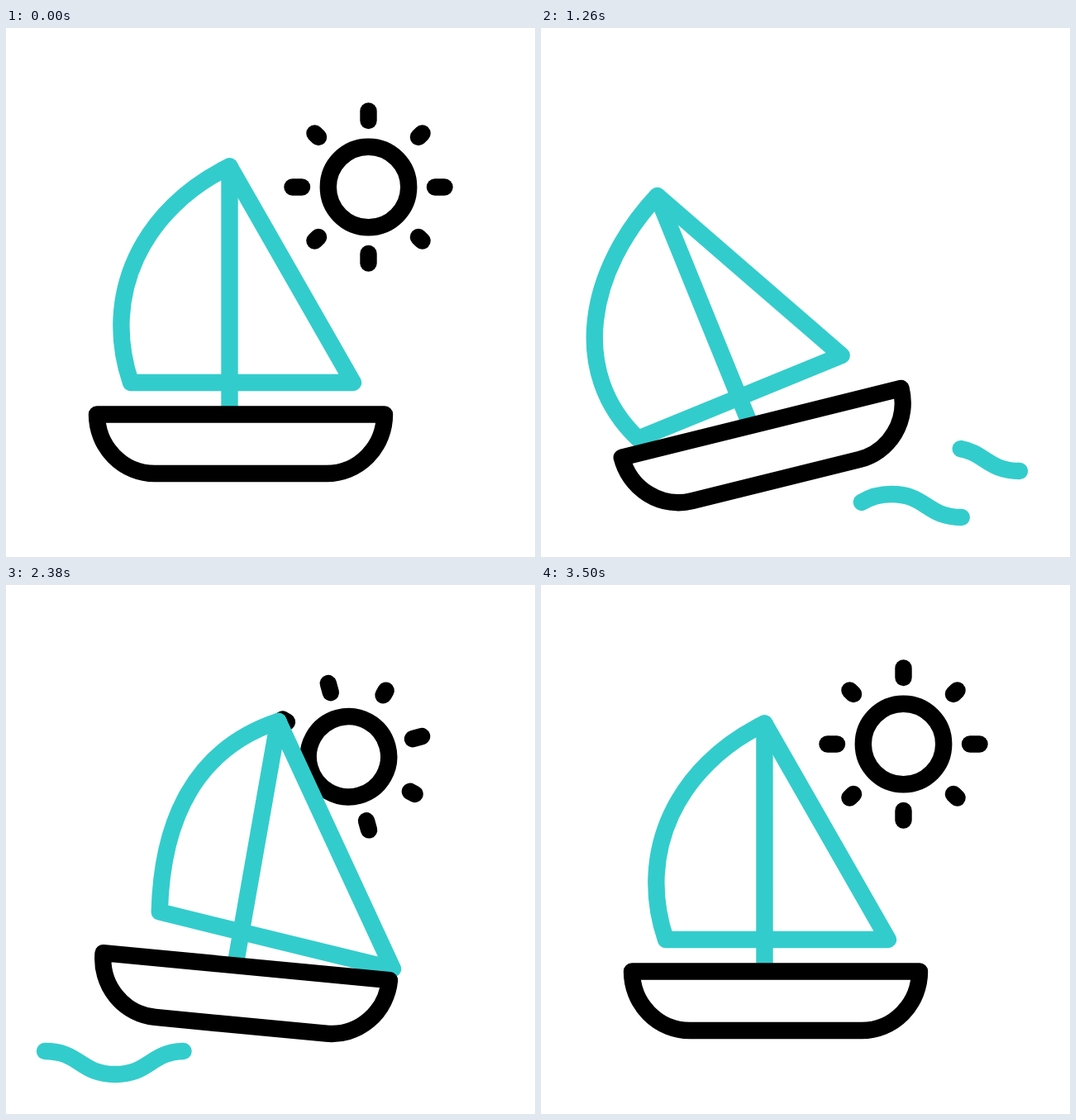
An HTML page that plays this animation: 640x640 px, repeating every 3.6 s.

```html
<!DOCTYPE html>
<html lang="en">
<head>
<meta charset="utf-8">
<title>Sailing boat</title>
<style>
  html, body { margin: 0; width: 100%; height: 100%; overflow: hidden; background: #fff; }
  svg { display: block; width: 100vw; height: 100vh; }
  .line { fill: none; stroke-width: 20.4; stroke-linecap: round; stroke-linejoin: round; }
  .ink { stroke: #000; }
  .sea { stroke: #3cc; }
  .solid { fill: #fff; }
</style>
</head>
<body>
<svg viewBox="0 0 640 640">
  <g id="sun" class="line ink"><circle r="48.7"/></g>
  <path id="back" class="line sea" pathLength="1"/>
  <path id="front" class="line sea" pathLength="1"/>
  <g id="boat">
    <g id="rig" class="line sea">
      <path id="sail" class="solid"/>
      <path d="M0 0V-300"/>
    </g>
    <path class="line ink solid" d="M-174 0H174A70 71.5 0 0 1 104 71.5H-104A70 71.5 0 0 1 -174 0Z"/>
  </g>
</svg>
<script>
const LOOP = 3600;
const $ = id => document.getElementById(id);
const progress = (t, a, b) => Math.min(1, Math.max(0, (t - a) / (b - a)));
const ease = (t, a, b) => {
  const p = progress(t, a, b);
  return p * p * (3 - 2 * p);
};
const bump = (t, a, peak, b) => ease(t, a, peak) - ease(t, peak, b);

// The hull rocks between a few turning points: [time, degrees].
const turns = [[680, 0], [1400, -15.4], [2210, 8.8], [2720, -4], [3500, 0]];
const tiltAt = t => turns.slice(1).reduce((sum, [end, angle], i) => {
  const [begin, before] = turns[i];
  return sum + (angle - before) * ease(t, begin, end);
}, 0);

const rays = Array.from({ length: 8 }, (_, i) =>
  `<path d="M0 ${i % 2 ? -85.5 : -80.5}V-92" transform="rotate(${i * 45})"/>`);
$("sun").innerHTML += rays.join("");

// The sun rolls down behind the sail, then back up.
function drawSun(t) {
  const sinking = t < 840;
  $("sun").style.display = sinking || t > 1900 ? "" : "none";
  const d = sinking
    ? 222 * (Math.max(0, t - 191) / 609) ** 2
    : 224 * (1 - progress(t, 1820, 2680)) ** 2 + 1.4 * (1 - ease(t, 2680, 3500));
  const turn = -d * (0.54 + 0.0002 * d);
  $("sun").setAttribute("transform",
    `translate(${438.5 - 0.845 * d} ${192.5 + 0.535 * d}) rotate(${turn})`);
}

function drawWave(id, x, y, halves, from, to) {
  const el = $(id);
  let d = `M${x} ${y}`;
  for (let i = 0; i < halves; i++) {
    const dy = i % 2 ? -28 : 28;
    d += `c42.5 0 42.5 ${dy} 85 ${dy}`;
  }
  el.style.display = to - from > 0.001 ? "" : "none";
  el.setAttribute("d", d);
  el.setAttribute("stroke-dasharray", `${Math.max(0, to - from)} 3`);
  el.setAttribute("stroke-dashoffset", -from);
}

function drawBoat(t) {
  const tilt = tiltAt(t);
  const lean = 1.64 * tiltAt(t - 20);
  const x = 284 + 1.25 * tilt;
  const y = 467.5 - 0.74 * tilt - 7 * bump(t, 2210, 2720, 3500);
  $("boat").setAttribute("transform", `translate(${x} ${y}) rotate(${tilt})`);
  $("rig").setAttribute("transform", `translate(-13.5 0) rotate(${lean - tilt})`);

  // Two gusts bend the sail, first full, then stretched.
  const full = bump(t, 680, 1260, 1880);
  const taut = bump(t, 1880, 2380, 2850);
  const lx = -119.5 - 12.5 * full + 18 * taut;
  const ly = -38.5 + 2 * full - 9.5 * taut;
  const rx = 149.5 - 15.5 * full + 39 * taut;
  const ry = -38.5 + 1.3 * full + 9.5 * taut;
  const belly = 12 * full - 20 * taut;
  $("sail").setAttribute("d",
    `M0 -300L${rx} ${ry}L${lx} ${ly}` +
    `C${lx - 36 - belly} ${ly - 106} ${-105.5 - belly / 2} -248.5 0 -300Z`);
}

function draw(t) {
  const drift = 0.0328 * (t - 1260);
  const from = 1 - progress(t, 870, 2253);
  drawSun(t);
  drawWave("back", 324 - drift, 508, 3, from, 1 - progress(t, 1600, 3145));
  drawWave("front", 83.8 - drift, 564, 5, from, 1 - progress(t, 1446, 2991));
  drawBoat(t);
}

const start = performance.now();
function frame() {
  draw((performance.now() - start) % LOOP);
  requestAnimationFrame(frame);
}
draw(0);
requestAnimationFrame(frame);
</script>
</body>
</html>
```
